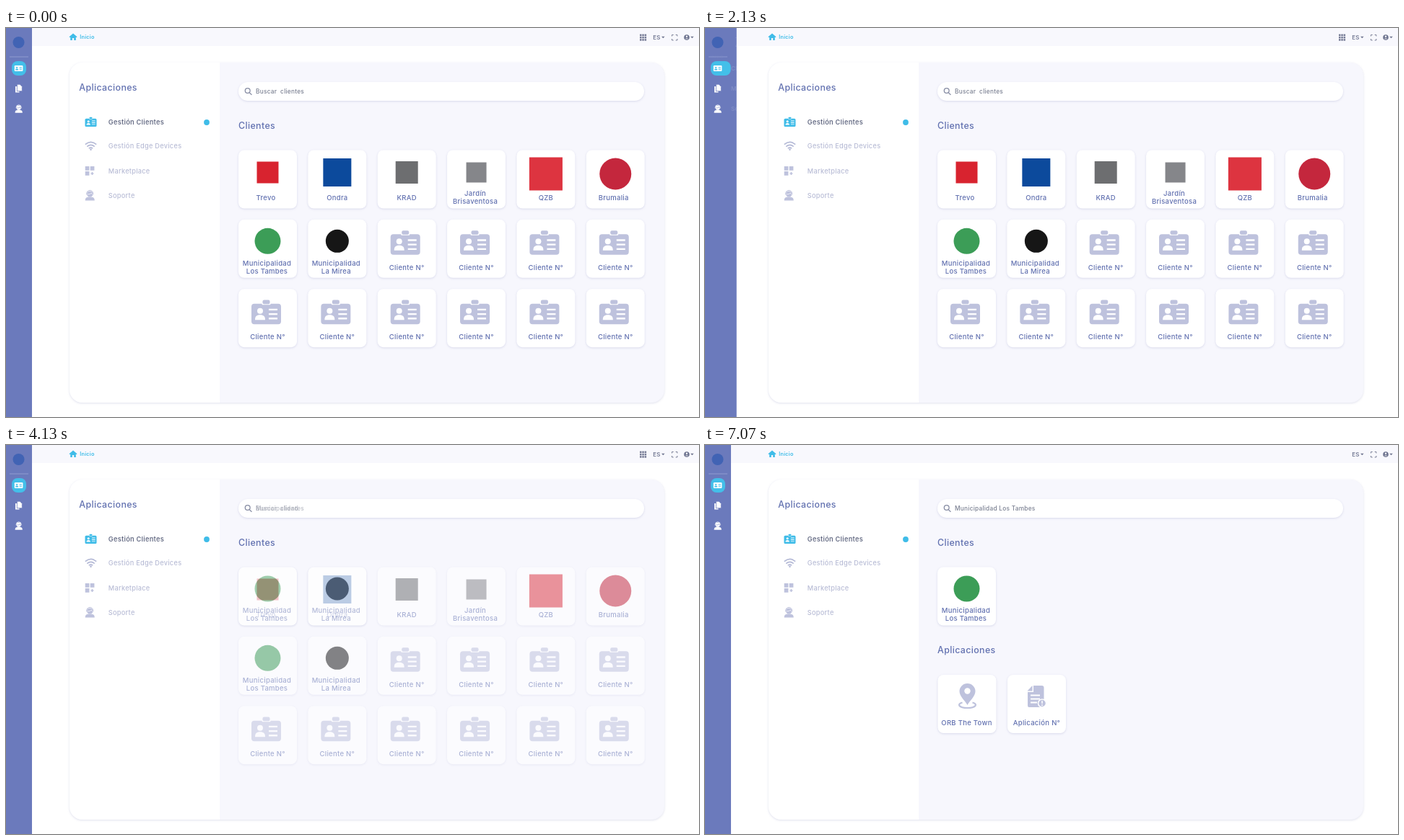
These frames come from a looping animation (960 by 540 pixels, 8000 ms). An HTML page:

```html
<!DOCTYPE html>
<html lang="es">
<head>
<meta charset="utf-8">
<style>
html, body { margin: 0; width: 100%; height: 100%; overflow: hidden; background: #fff; }
svg { display: block; width: 100vw; height: 100vh; font: 600 9.2px Inter, sans-serif; }
text { white-space: pre; letter-spacing: .03em; }
.card, .panel { filter: drop-shadow(0 1.5px 1.5px rgba(70, 80, 150, .17)); }
.card text { font-size: 9.5px; font-weight: 500; text-anchor: middle; fill: #6271b0; }
.icon { color: #bec2dd; }
.cyan { color: #3fbce8; }
.white { color: #fff; }
.head { font-size: 12.4px; font-weight: 500; fill: #6271b0; }
.query { font-size: 8.3px; font-weight: 500; fill: #7b8092; }
.menu { font-weight: 500; fill: #b9bdd6; }
.side { font-size: 8.2px; fill: #fff; }
</style>
</head>
<body>
<svg viewBox="0 0 960 540">
  <defs>
    <g id="idcard">
      <rect width="41" height="28.5" rx="4" fill="currentColor"/>
      <g fill="var(--hole, #fff)">
        <circle cx="12" cy="10" r="4"/>
        <path d="M5 22.500c0-5 2-7 7-7s7 2 7 7z"/>
        <path d="M24 7h12v2.300h-12zm0 6.200h12v2.300h-12zm0 6.200h12v2.300h-12z"/>
      </g>
    </g>
    <g id="badge">
      <use href="#idcard" y="5.500"/>
      <rect x="14.500" y="4" width="12" height="3" rx="1" fill="#fff"/>
      <rect x="15.500" y=".3" width="10" height="5.700" rx="2" fill="currentColor"/>
    </g>
    <g id="agent" fill="currentColor">
      <circle cx="6.500" cy="5" r="4"/>
      <path d="M0 14c0-4 2-5 6.500-5s6.500 1 6.500 5z"/>
      <path d="M2 6V4.500a4.500 4.500 0 0 1 9 0V6" fill="none" stroke="currentColor"/>
      <path d="M3.500 5.500q4 0 5-1.800q.5 1.300 1.500 1.500" fill="none" stroke="var(--hole, #fff)" stroke-width=".7"/>
    </g>
    <path id="caret" d="M0 0h4.600l-2.300 2.600z" fill="#6f7590"/>
    <clipPath id="sideClip"><rect id="clipBox" height="540"/></clipPath>
  </defs>

  <rect width="960" height="540" fill="#fff"/>
  <rect x="36" width="924" height="25" fill="#f8f8fd"/>

  <!-- top bar -->
  <path d="M87.500 12.300 93 7.500l5.500 4.800-.8.9-.9-.7v4.500h-2.600v-3h-2.400v3h-2.600v-4.500l-.9.700z" fill="#3fbce8"/>
  <text x="102.300" y="15.300" font-size="7.300" fill="#3fbce8">Inicio</text>
  <g id="apps" fill="#747a94"></g>
  <text x="896.300" y="15.900" font-size="7.900" fill="#747a94">ES</text>
  <use href="#caret" x="908" y="11.700"/>
  <path d="M922.500 11.500v-2h2.200m3 0h2.200v2m0 3.500v2h-2.200m-3 0h-2.200v-2" fill="none" stroke="#7c8198"/>
  <circle cx="943" cy="13" r="3.800" fill="#6f7590"/>
  <circle cx="943" cy="11.800" r="1.200" fill="#fff"/>
  <path d="M940.800 15.300q2.200-2.300 4.400 0z" fill="#fff"/>
  <use href="#caret" x="948.200" y="11.700"/>

  <!-- main panel -->
  <g class="panel">
    <rect x="88" y="48" width="824" height="472" rx="18" fill="#f7f7fd"/>
    <path d="M296 48H106a18 18 0 0 0-18 18V502a18 18 0 0 0 18 18H296z" fill="#fff"/>
  </g>
  <text class="head" x="101.300" y="87.200">Aplicaciones</text>
  <use href="#badge" class="cyan" transform="translate(109.500 123.700) scale(.39)"/>
  <text x="141.800" y="134.300" fill="#6a7088">Gestión Clientes</text>
  <circle cx="278" cy="131" r="3.900" fill="#3fbce8"/>
  <g fill="none" stroke="#b4b9d6" stroke-width="1.700">
    <path d="M109.800 161.700q7.700-6.600 15.400 0M112.300 164.600q5.200-4.400 10.400 0M114.800 167.200q2.700-2.200 5.400 0"/>
  </g>
  <circle cx="117.500" cy="168.800" r="1.300" fill="#b4b9d6"/>
  <text class="menu" x="141.800" y="167.100">Gestión Edge Devices</text>
  <path d="M109.700 192h5.700v5.700h-5.700zm7 0h5.700v5.700h-5.700zm-7 7h5.700v5.700h-5.700zm9 1h1.500v1.200h1.200v1.500h-1.200v1.200h-1.500v-1.200h-1.200v-1.500h1.200z" fill="#bec2dd"/>
  <text class="menu" x="141.800" y="201.700">Marketplace</text>
  <use href="#agent" class="icon" x="109.700" y="225.400"/>
  <text class="menu" x="141.800" y="235.600">Soporte</text>

  <rect class="card" x="322" y="75" width="562" height="26" rx="13" fill="#fff"/>
  <g fill="none" stroke="#868ca3" stroke-width="1.300">
    <circle cx="334.700" cy="87" r="3.400"/><path d="M337.200 89.600l3.200 3.200"/>
  </g>
  <text class="head" x="322" y="140">Clientes</text>

  <g id="all"><text class="query" x="346" y="91.400">Buscar  clientes</text></g>
  <g id="found"><text class="query" x="346" y="91.400">Municipalidad</text></g>
  <g id="kept"></g>
  <g id="result">
    <text class="query" x="346" y="91.400">Municipalidad Los Tambes</text>
    <text class="head" x="322" y="289.300">Aplicaciones</text>
  </g>

  <circle id="cursor" fill="#fff" stroke="#3fbce8"/>

  <!-- sidebar -->
  <g clip-path="url(#sideClip)">
    <rect width="170" height="540" fill="#6b7abc"/>
    <circle cx="17.500" cy="20" r="8" fill="#4163b4"/>
    <path id="rule" d="M5 40h26" stroke="#8f9bd0"/>
    <rect id="pill" x="8" y="46" height="20" rx="8" fill="#43bfe9"/>
    <use href="#idcard" class="white" style="--hole: #43bfe9" transform="translate(11.700 52) scale(.285)"/>
    <path d="M13 81h5.500v8.500H13z" fill="#fff"/>
    <path d="M15.300 78.200h4l3 3v6.500h-7z" fill="#fff" stroke="#6b7abc" stroke-width=".8"/>
    <use href="#agent" class="white" style="--hole: #6b7abc" transform="translate(12.600 106.800) scale(.78)"/>
    <g id="labels">
      <text x="41" y="26.300" font-size="16.800" font-weight="300" fill="#e3e7f6">Zunav.ai</text>
      <text x="8" y="42" font-size="5.300" fill="#8f9bd0">INICIO</text>
      <text class="side" x="36" y="59">Clientes</text>
      <text class="side" x="36" y="87">Marketplace</text>
      <text class="side" x="36" y="115">Soporte</text>
    </g>
  </g>
</svg>
<script>
const $ = id => document.getElementById(id);
const PITCH = 96.35, LEFT = 322, TOP = 169.5;

const square = (size, color, y = 31) =>
  `<rect x="${40.5 - size / 2}" y="${y - size / 2}" width="${size}" height="${size}" fill="${color}"/>`;
const disc = (r, color, y = 31) => `<circle cx="40.5" cy="${y}" r="${r}" fill="${color}"/>`;
const badge = '<use href="#badge" class="icon" x="18" y="15"/>';
const pin = `<g fill="#bec2dd">
  <path d="M41 42c-3-6-11-12-11-19a11 11 0 0 1 22 0c0 7-8 13-11 19z"/>
  <circle cx="41" cy="22.500" r="4.200" fill="#fff"/>
  <path d="M34 38.500c-8 2-5 7.500 7 7.500s15-5.500 7-7.500" fill="none" stroke="#bec2dd" stroke-width="2.200"/></g>`;
const doc = `<g fill="#bec2dd">
  <path d="M36 15h11.500a3 3 0 0 1 3 3v25a2 2 0 0 1-2 2H30a2 2 0 0 1-2-2V24h8z"/><path d="M34.500 15v7.500H27.500z"/>
  <path d="M32 28.500h13M32 33.500h13M32 38.500h9" stroke="#fff" stroke-width="2"/>
  <circle cx="48" cy="39.500" r="5.500" stroke="#fff" stroke-width="1.500"/>
  <path d="M48 36v4m0 1.300v1.600" stroke="#fff" stroke-width="1.500"/></g>`;

function addCard(group, x, y, art, label, dx = 0) {
  const lines = label.split('|');
  const first = lines.length > 1 ? 63.900 : 69.900;
  const text = lines.map((s, i) => `<text x="${40.5 + dx}" y="${first + i * 10.8}">${s}</text>`).join('');
  $(group).insertAdjacentHTML('beforeend',
    `<g class="card" transform="translate(${x} ${y})"><rect width="81" height="81" rx="8" fill="#fff"/>${art}${text}</g>`);
}

const tambes = [disc(18, '#3c9d57', 30), 'Municipalidad|Los Tambes', -1];
const mirea = [disc(16, '#161616', 30), 'Municipalidad|La Mirea', -1.5];
const clients = [
  [square(30, '#d8232f'), 'Trevo', -2.5],
  [square(39, '#0c4a9c'), 'Ondra'],
  [square(31, '#6d6e70'), 'KRAD'],
  [square(28, '#85868a'), 'Jardín|Brisaventosa', -1.5],
  [square(46, '#dd3440', 33), 'QZB'],
  [disc(22, '#c4273d', 33), 'Brumalia', -2.5],
  tambes, mirea
];
for (let i = 0; i < 18; i++)
  addCard('all', LEFT + i % 6 * PITCH, TOP + Math.floor(i / 6) * PITCH, ...(clients[i] || [badge, 'Cliente N°']));
addCard('kept', LEFT, TOP, ...tambes);
addCard('found', LEFT + PITCH, TOP, ...mirea);
addCard('result', LEFT + .5, 319, pin, 'ORB The Town', -.5);
addCard('result', LEFT + 97, 319, doc, 'Aplicación N°');

for (let i = 0; i < 9; i++)
  $('apps').insertAdjacentHTML('beforeend',
    `<rect x="${878 + i % 3 * 3.3}" y="${8.6 + Math.floor(i / 3) * 3.3}" width="2.500" height="2.500"/>`);

const ramp = (t, start, length) => Math.min(1, Math.max(0, (t - start) / length));
const easeOut = (p, power) => 1 - (1 - p) ** power;
const mix = (a, b, p) => a + (b - a) * p;
const set = (id, attrs) => { for (const k in attrs) $(id).setAttribute(k, attrs[k]); };

function drawSidebar(t) {
  const open = easeOut(ramp(t, 800, 730), 4) - easeOut(ramp(t, 1733, 800), 4);
  const w = mix(36, 157.5, open);
  const shown = Math.min(1, (w - 36) / 55);
  set('clipBox', { width: w });
  set('pill', { width: w - 16 });
  set('labels', { opacity: shown });
  set('rule', { opacity: 1 - shown });
}

// The ring glides in, then widens like a click and fades.
function drawCursor(t) {
  const second = t > 5000;
  const s = t - (second ? 5470 : 2670);
  const [x0, y0, x1, y1] = second ? [476, 200, 362, 205] : [480, 284, 376.5, 88.5];
  const move = easeOut(ramp(s, 0, 560), 3), click = ramp(s, 600, 300);
  set('cursor', {
    cx: mix(x0, x1, move), cy: mix(y0, y1, move),
    r: mix(9, 12.5, click),
    'stroke-width': mix(2.5, 1, click),
    'fill-opacity': mix(.7, 0, click),
    opacity: ramp(s, 0, 150) * mix(1, .75, click) * (1 - ramp(s, 930, 330))
  });
}

function frame() {
  const t = performance.now() % 8000;
  const search = easeOut(ramp(t, 4000, 470), 2);
  const select = easeOut(ramp(t, 6870, 200), 2);
  set('all', { opacity: 1 - search });
  set('kept', { opacity: search });
  set('found', { opacity: search * (1 - select) });
  set('result', { opacity: select });
  set('apps', { opacity: 1 - select });
  drawSidebar(t);
  drawCursor(t);
  requestAnimationFrame(frame);
}
frame();
</script>
</body>
</html>
```
